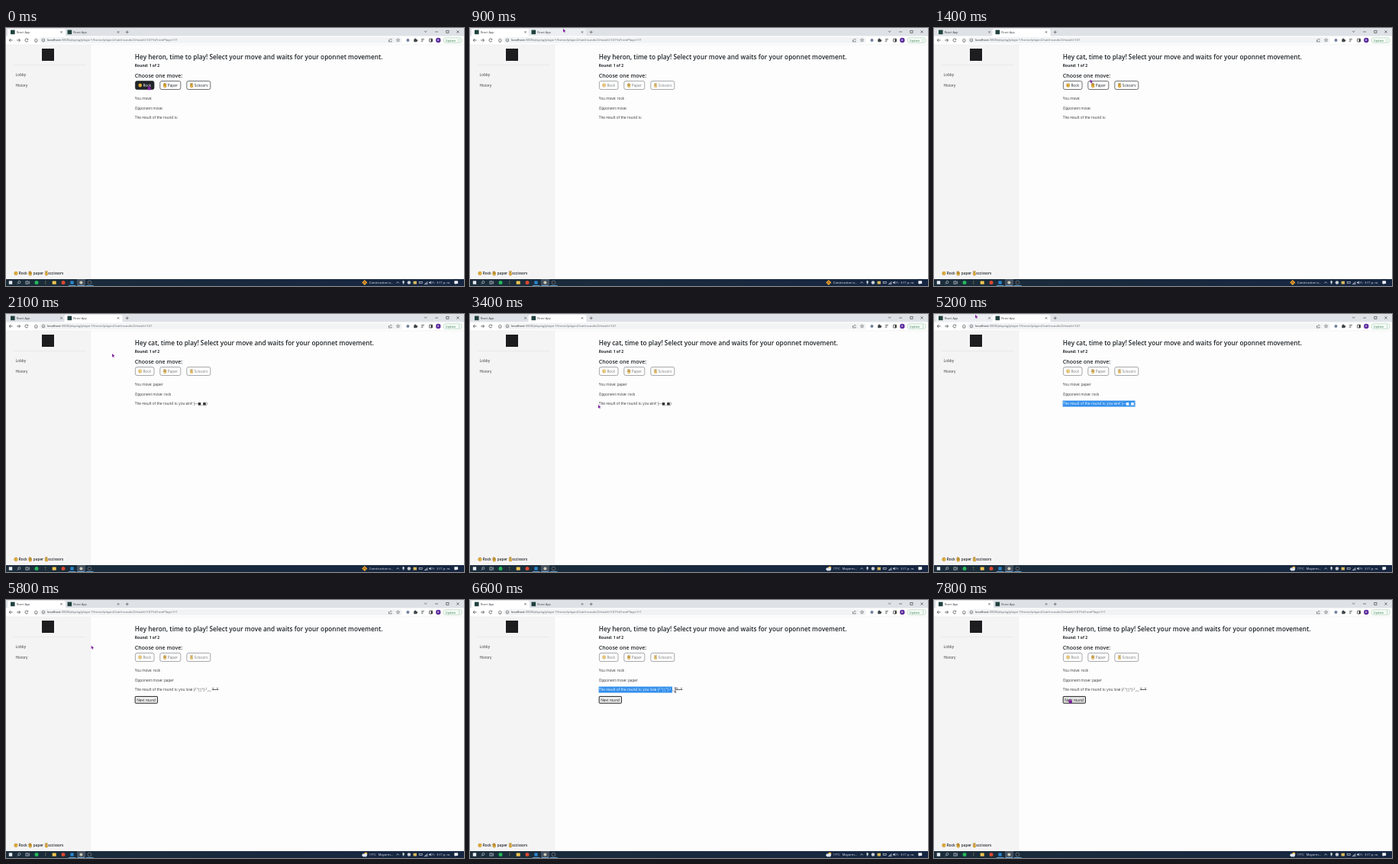
An HTML page with a canvas for the animation above (8 s loop, 600 by 338 pixels).

```html
<!DOCTYPE html>
<html lang="en">
<head>
<meta charset="utf-8">
<title>Rock paper scissors</title>
<style>
  html, body { margin: 0; width: 100%; height: 100%; overflow: hidden; background: #fff; }
  canvas { display: block; width: 100vw; height: 100vh; }
</style>
</head>
<body>
<canvas id="stage" width="600" height="338"></canvas>
<script>
const c = document.getElementById('stage').getContext('2d');
const LOOP = 8000;
const INK = '#212529';
const FONT = '"Open Sans", "DejaVu Sans", "Noto Sans CJK JP", sans-serif';

// Pointer path: time, x, y
const PATH = [
  [0, 187, 76], [300, 187, 76], [900, 122, 1], [1000, 122, 2],
  [1500, 214, 75], [1700, 214, 75], [2100, 139, 52], [2400, 132, 30],
  [2700, 150, 70], [3400, 168, 119], [3600, 169, 118], [4200, 272, 118],
  [4550, 272, 118], [5200, 54, 1], [5350, 54, 1], [6250, 169, 118],
  [6350, 169, 118], [6600, 269, 118], [7000, 289, 118], [7200, 289, 118],
  [7750, 178, 130], [8000, 178, 130]
];

function pointerAt(t) {
  const i = Math.max(1, PATH.findIndex(p => p[0] > t));
  const [t0, x0, y0] = PATH[i - 1], [t1, x1, y1] = PATH[i];
  const u = (t - t0) / (t1 - t0), k = u * u * (3 - 2 * u);
  return { x: x0 + (x1 - x0) * k, y: y0 + (y1 - y0) * k };
}

function rect(x, y, w, h, fill) {
  c.fillStyle = fill;
  c.fillRect(x, y, w, h);
}

function paint(fill, stroke, lw) {
  if (fill) { c.fillStyle = fill; c.fill(); }
  if (stroke) { c.strokeStyle = stroke; c.lineWidth = lw; c.stroke(); }
}

function box(x, y, w, h, r, fill, stroke, lw = 0.7) {
  c.beginPath();
  c.roundRect(x, y, w, h, r);
  paint(fill, stroke, lw);
}

function disc(x, y, r, fill, stroke, lw = 0.7) {
  c.beginPath();
  c.arc(x, y, r, 0, 7);
  paint(fill, stroke, lw);
}

function line(color, lw, ...pts) {
  c.beginPath();
  for (let i = 0; i < pts.length; i += 2) c.lineTo(pts[i], pts[i + 1]);
  paint(null, color, lw);
}

function shape(fill, ...pts) {
  c.beginPath();
  for (let i = 0; i < pts.length; i += 2) c.lineTo(pts[i], pts[i + 1]);
  c.closePath();
  paint(fill);
}

// y is the middle of the capitals; the scale keeps small advances unrounded
function text(s, x, y, size, color = INK, weight = 400) {
  c.save();
  c.translate(x, y + size * 0.36);
  c.scale(0.1, 0.1);
  c.font = `${weight} ${size * 10}px ${FONT}`;
  c.fillStyle = color;
  c.fillText(s, 0, 0);
  const w = c.measureText(s).width / 10;
  c.restore();
  return w;
}

function hand(kind, x, y) {
  const skin = '#fbc540', edge = '#86601f';
  const finger = (dx, top) => {
    line(edge, 1.2, x + dx * 0.7, y + 1, x + dx, y + top);
    line(skin, 0.7, x + dx * 0.7, y + 1, x + dx, y + top + 0.3);
  };
  if (kind === 'rock') {
    disc(x, y, 2.3, skin, edge, 0.4);
    for (const d of [-0.9, 0.3]) line(edge, 0.35, x + d, y - 1.6, x + d, y + 0.2);
    line(edge, 0.4, x - 1.6, y + 0.5, x + 0.8, y + 0.7);
  } else if (kind === 'paper') {
    box(x - 1.6, y - 0.2, 3.4, 3.1, 1.4, skin, edge, 0.4);
    finger(-1.6, -1.9);
    finger(-0.5, -2.8);
    finger(0.6, -2.7);
    finger(1.7, -1.6);
  } else {
    finger(-1.2, -3);
    finger(0.7, -3.1);
    disc(x, y + 1.1, 1.8, skin, edge, 0.4);
    line(edge, 0.4, x - 1, y + 0.9, x + 1, y + 1.3);
  }
}

function moveButton(x, w, label, kind, lit, off) {
  c.globalAlpha = off ? 0.6 : 1;
  box(x, 69.5, w, 11, 2.2, lit ? INK : null, INK, 0.65);
  hand(kind, x + 6.3, 75.1);
  text(label, x + 10, 75.3, 4.75, lit ? '#fff' : INK);
  c.globalAlpha = 1;
}

function tab(x, active, hover) {
  if (active || hover) {
    box(x, 1, 76, 14, [2.5, 2.5, 0, 0], active ? '#fff' : '#eceef1');
  }
  rect(x + 4, 2.6, 5.6, 5.6, '#20423f');
  text('React App', x + 11.8, 5.4, 3.75, '#3c4043');
  cross(x + 70.5, 5.4, 1.2);
}

function cross(x, y, r) {
  line('#333', 0.6, x - r, y - r, x + r, y + r);
  line('#333', 0.6, x - r, y + r, x + r, y - r);
}

function browser(second, p) {
  rect(0, 0, 600, 11, '#dee1e6');
  const over = p.y < 10;
  tab(2, !second, over && p.x < 77);
  tab(76.5, second, over && p.x >= 77 && p.x < 152);
  line('#444', 0.6, 156.7, 5.4, 160.7, 5.4);
  line('#444', 0.6, 158.7, 3.4, 158.7, 7.4);
  line('#333', 0.6, 548, 3.8, 549.7, 5.4, 551.4, 3.8);
  line('#333', 0.6, 562.2, 5, 566, 5);
  c.strokeRect(576.8, 3.4, 3.2, 3.2);
  cross(592, 5, 1.6);

  rect(0, 10.5, 600, 11.5, '#fff');
  rect(0, 21.7, 600, 0.5, '#e6e7e9');
  const nav = '#4b4f53', y = 16;
  line(nav, 0.8, 8.6, y, 4.2, y);
  line(nav, 0.8, 6.2, y - 2, 4.2, y, 6.2, y + 2);
  line(nav, 0.8, 14.2, y, 18.6, y);
  line(nav, 0.8, 16.6, y - 2, 18.6, y, 16.6, y + 2);
  c.beginPath();
  c.arc(27, y, 2, 0.4, 5.6);
  c.stroke();
  shape(nav, 27.4, y - 0.5, 29.2, y - 0.5, 29.2, y - 2.3);
  line(nav, 0.7, 37.2, y + 0.1, 39.4, y - 2.2, 41.6, y + 0.1);
  line(nav, 0.7, 38, y - 0.3, 38, y + 2.2, 40.8, y + 2.2, 40.8, y - 0.3);

  box(43.5, 12.1, 475.5, 7.8, 3.9, '#f1f3f4');
  disc(49, y, 1.9, null, nav, 0.6);
  line(nav, 0.6, 49, y - 0.3, 49, y + 1.2);
  const w = text('localhost', 54, y, 4.16, '#202124');
  const tail = second ? '' : '?isFromPlayer1/1';
  text(':3000/playing/player1/heron/player2/cat/rounds/2/match/141' + tail,
    54 + w, y, 4.16, '#5f6368');

  line(nav, 0.6, 501.5, y - 0.8, 501.5, y + 2, 505.2, y + 2, 505.2, y + 0.5);
  line(nav, 0.6, 502.5, y + 0.5, 503.5, y - 1.4, 505.6, y - 1.4);
  const star = [];
  for (let i = 0; i <= 10; i++) {
    const r = i % 2 ? 1 : 2.3, a = i * Math.PI / 5;
    star.push(513.6 + r * Math.sin(a), y - r * Math.cos(a));
  }
  line(nav, 0.5, ...star);
  disc(526.5, y, 2, '#6f7f9d');
  box(534.3, y - 1.5, 4, 3.8, 0.5, '#3f4347');
  disc(536.2, y - 1.7, 0.9, '#3f4347');
  disc(538.5, y + 0.4, 0.9, '#3f4347');
  line(nav, 0.7, 544, y - 1.5, 548, y - 1.5);
  line(nav, 0.7, 544, y + 0.1, 547, y + 0.1);
  line(nav, 0.7, 544, y + 1.7, 546, y + 1.7);
  box(554.5, y - 1.9, 4, 4, 0.4, '#fff', '#333', 0.7);
  rect(556.6, y - 1.8, 1.9, 3.8, '#333');
  disc(566.3, y, 3.2, '#5b2a9d');
  text('A', 565.1, y, 3.5, '#fff');
  box(572.8, y - 3.3, 24.6, 6.8, 3.4, '#f3faf5', '#a9cdb4', 0.6);
  text('Update', 575.8, y + 0.1, 3.9, '#3c8153');
  for (const d of [-1.5, 0, 1.5]) disc(593.7, y + 0.1 + d, 0.4, '#3c8153');
}

function sidebar() {
  rect(0, 22, 110, 307, '#f5f4f5');
  rect(110, 22, 1, 307, '#f0eff0');
  rect(47, 27, 16, 16, '#1d1d1f');
  rect(10, 48, 95, 0.5, '#dcdcde');
  text('Lobby', 12.6, 61.1, 4.75, '#333');
  text('History', 12.6, 75, 4.75, '#333');
  hand('rock', 13, 321.4);
  text('Rock', 16.8, 321.4, 4.7, INK, 600);
  hand('paper', 31.6, 321.4);
  text('paper', 35.8, 321.4, 4.7, INK, 600);
  hand('scissors', 53, 321.4);
  text('sccissors', 55.2, 321.4, 4.7, INK, 600);
}

function resultLine(s, end) {
  text(s, 168.8, 117.7, 4.7, '#333');
  if (end <= 169) return;
  c.save();
  c.beginPath();
  c.rect(168.6, 113.6, end - 168.6, 7.8);
  c.clip();
  rect(168, 113, 130, 9, '#338fec');
  text(s, 168.8, 117.7, 4.7, '#fff');
  c.restore();
}

function page(t, second, p) {
  rect(0, 22, 600, 307, '#fdfdfd');
  sidebar();
  const back = t >= 5300;
  const mine = second ? (t >= 1700 ? 'paper' : '') : (t >= 300 ? 'rock' : '');
  const theirs = second ? (t >= 1900 ? 'rock' : '') : (back ? 'paper' : '');
  const off = mine !== '';

  text(`Hey ${second ? 'cat' : 'heron'}, time to play! Select your move and waits for your oponnet movement.`,
    168.8, 38.2, 8.29, INK, 600);
  text('Round: 1 of 2', 168.8, 49.2, 5, INK, 700);
  text('Choose one move:', 168.8, 62.8, 7.07, INK, 600);

  const overRow = !off && p.y > 69 && p.y < 81;
  const over = (x, w) => overRow && p.x > x && p.x < x + w;
  moveButton(169.4, 24.6, 'Rock', 'rock', over(169, 25), off);
  moveButton(201.8, 27, 'Paper', 'paper', over(202, 27), off);
  moveButton(236.8, 31, 'Scissors', 'scissors', over(237, 31), off);

  text('You move: ' + mine, 168.8, 92.6, 4.7, '#333');
  text('Opponent move: ' + theirs, 168.8, 105.1, 4.7, '#333');

  let ending = '', end = 0;
  if (theirs && second) {
    ending = ' you win! (⌐■_■)';
    if (t >= 3600) end = t < 4200 ? Math.min(p.x, 263.5) : 263.5;
  } else if (theirs) {
    ending = ' you lose (╯°□°) ╯︵ ┻━┻';
    if (t >= 6350 && t < 7200) end = Math.min(p.x - 4, 279);
  }
  resultLine('The result of the round is:' + ending, end);

  if (back && t >= 5350) {
    const hover = p.y > 126 && p.y < 136 && p.x < 199;
    box(169.2, 126.4, 29.2, 8.8, 0.6, hover ? '#e5e5e5' : '#f2f2f2', '#222', 1);
    text('Next round', 171.2, 131, 4.7, '#111');
  }
}

function taskbar(t) {
  const sky = c.createLinearGradient(0, 0, 600, 0);
  sky.addColorStop(0, '#1b2d3a');
  sky.addColorStop(1, '#162642');
  rect(0, 329, 600, 9, sky);
  const y = 333.5, pale = '#d5dbe1';
  rect(3.8, y - 2.2, 4.4, 4.4, '#e6ebf0');
  disc(17.3, y - 0.5, 1.6, null, pale, 0.6);
  line(pale, 0.7, 16.2, y + 0.7, 14.9, y + 2);
  c.strokeStyle = pale;
  c.strokeRect(26, y - 1.6, 3, 3.2);
  line(pale, 0.6, 30.6, y - 2, 30.6, y + 2);
  disc(40, y, 2.5, '#25b85a');
  disc(51.8, y - 1.3, 0.6, '#b9a45a');
  disc(51.8, y + 1.3, 0.6, '#b9a45a');
  rect(60.7, y - 2, 5, 4.2, '#f0c650');
  disc(75, y, 2.5, '#d9482f');
  rect(84.4, y - 2.1, 4.2, 4.2, '#2b86d1');
  rect(93, 329, 11, 9, '#465260');
  disc(98.4, y, 2, '#c9c7b4');
  disc(109.5, y, 2.4, '#222a33', '#8a949e', 0.6);
  for (const x of [82, 93.5, 105]) rect(x, 337.2, 9.5, 0.8, '#76b9ed');

  if (t < 2400) {
    shape('#f0a52c', 469.8, y - 3.6, 473.4, y, 469.8, y + 3.6, 466.2, y);
    line('#4a3413', 0.7, 468.3, y + 1, 469.8, y - 1.3, 471.2, y + 1);
    text('Construction o...', 475.8, y + 0.3, 4.1, '#eef1f4');
  } else {
    disc(471.3, y - 1, 2, '#f2b437');
    disc(468.4, y + 0.8, 2, '#dfe7ef');
    disc(471, y + 0.6, 2.2, '#dfe7ef');
    rect(468, y + 0.8, 4, 2, '#dfe7ef');
    text('17°C', 475.8, y + 0.3, 4.1, '#eef1f4');
    text('Mayorm...', 487.8, y + 0.3, 4.1, '#eef1f4');
  }
  line(pale, 0.7, 511.5, y + 0.9, 513.2, y - 0.9, 514.9, y + 0.9);
  box(519.5, y - 2.4, 2.2, 3.6, 1, pale);
  line(pale, 0.6, 520.6, y + 1, 520.6, y + 2.4);
  disc(528, y, 2.2, '#c9ced4');
  rect(533.6, y - 1.8, 4.4, 3.8, '#d9b95c');
  c.strokeStyle = pale;
  c.strokeRect(541.2, y - 1.2, 4, 2.4);
  for (let i = 0; i < 4; i++) rect(548.3 + i * 1.1, y + 1.6 - i, 0.7, 1 + i, pale);
  shape(pale, 554.2, y - 0.7, 555.2, y - 0.7, 556.6, y - 2, 556.6, y + 2, 555.2, y + 0.7, 554.2, y + 0.7);
  c.beginPath();
  c.arc(556.6, y, 1.8, -0.9, 0.9);
  c.stroke();
  line(pale, 0.6, 559.8, y - 1.2, 561.2, y + 1.2);
  text('3:11 p. m.', 564.3, y + 0.3, 3.9, '#eef1f4');
  box(587.3, y - 2.2, 4.8, 3.6, 0.3, '#eef1f4');
  shape('#eef1f4', 588.5, y + 1, 590.5, y + 1, 588.7, y + 2.6);
}

function pointer(t, p, second) {
  const { x, y } = p, hue = '#7f1fa0';
  const onText = y > 112 && y < 122 && x >= 169 && t >= 3500;
  const onMoves = y > 69 && y < 81 && x > 169 && x < 229 && (t < 300 || (t > 1400 && t < 1900));
  const onNext = !second && t > 5400 && y > 126 && x < 199;
  if (onText) {
    line('#33203f', 0.8, x, y - 3, x, y + 3);
    line('#33203f', 0.7, x - 1.3, y - 3, x + 1.3, y - 3);
    line('#33203f', 0.7, x - 1.3, y + 3, x + 1.3, y + 3);
  } else if (onMoves || onNext) {
    box(x - 0.5, y - 0.6, 1.5, 4, 0.7, hue);
    box(x - 1.5, y + 1.6, 4.4, 3.6, 1.2, hue);
  } else {
    shape(hue, x, y, x, y + 4.4, x + 1.1, y + 3.6, x + 1.9, y + 5.1,
      x + 2.7, y + 4.7, x + 2, y + 3.2, x + 3.4, y + 3.1);
  }
}

function draw(t) {
  const p = pointerAt(t);
  const second = t >= 1000 && t < 5300;
  c.clearRect(0, 0, 600, 338);
  page(t, second, p);
  browser(second, p);
  taskbar(t);
  pointer(t, p, second);
}

const start = performance.now();
function tick() {
  draw((performance.now() - start) % LOOP);
  requestAnimationFrame(tick);
}
tick();
</script>
</body>
</html>
```
